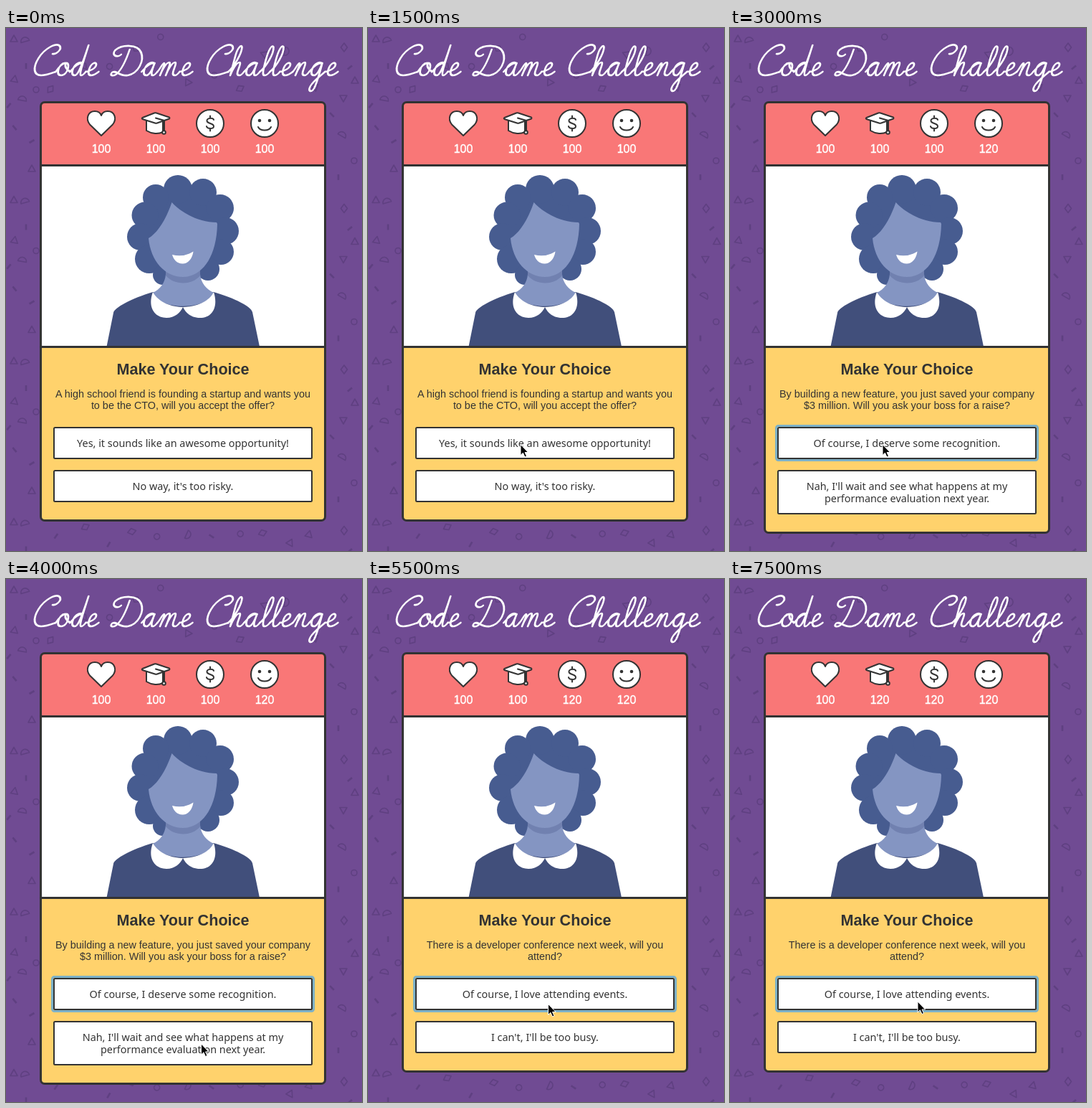
These frames come from a looping animation (497x729 px, 8000 ms). An HTML page:

```html
<!DOCTYPE html>
<html lang="en">
<head>
<meta charset="utf-8">
<title>Code Dame Challenge</title>
<style>
  html, body { margin: 0; width: 100%; height: 100%; overflow: hidden; background: #704b93; }
  svg { display: block; width: 497px; height: 729px; }
  text { text-anchor: middle; fill: #333; }
  .head { font: bold 21.6px "Liberation Sans", Arial, sans-serif; }
  .body { font: 14.4px "Liberation Sans", Arial, sans-serif; }
  .label { font: 14.4px "Noto Sans", sans-serif; }
  .score { font: 16px "Liberation Sans", Arial, sans-serif; fill: #fff; stroke: #fff; stroke-width: .4; }
  .icon { fill: #fff; stroke: #333; stroke-width: 2; stroke-linejoin: round; stroke-linecap: round; }
  .line { fill: none; }
  .button { fill: #fff; stroke: #333; stroke-width: 2; }
</style>
</head>
<body>
<svg viewBox="0 0 497 729">
  <rect width="497" height="729" fill="#704b93"/>
  <g id="confetti" fill="none" stroke="#5f4081" stroke-width="1.6" stroke-linejoin="round"/>
  <g id="title" role="img" aria-label="Code Dame Challenge" fill="none" stroke="#fff" stroke-width="2.7" stroke-linecap="round" stroke-linejoin="round"/>

  <rect class="frame" x="48.5" y="103.5" width="397" height="583" rx="5.5" fill="#ffd26c"/>
  <rect x="49" y="104" width="396" height="92" rx="5" fill="#f97777"/>
  <rect x="50" y="192" width="394" height="252" fill="#fff"/>

  <g class="icon">
    <path d="M133 150 L117 134.500C111 127 114 116 124 116C129 116 132 119 133 122C134 119 137 116 142 116C152 116 155 127 149 134.500Z"/>
    <path d="M196 128V143C204 148 213 148 219 145V129Z"/>
    <path d="M190.500 125 L207 118.500Q208.500 118 210 118.500L228 124.500Q229 125.500 228 126.500L211 132.500Q209.500 133 208 132.500L190.500 127Q189 126 190.500 125Z"/>
    <path class="line" d="M209 125.500 L221 129V143"/>
    <circle cx="220.500" cy="145.500" r="2.300"/>
    <circle cx="285" cy="133" r="19"/>
    <path class="line" d="M290 128C289 125 281 125 280.500 129C280 134 290 132 290 137C290 141 281 141 280 137M285 122.500V126M285 140V143.500"/>
    <circle cx="361" cy="133" r="19"/>
    <path class="line" d="M352 138C355 144 367 144 370 138"/>
  </g>
  <g fill="#333"><circle cx="354" cy="129" r="2.300"/><circle cx="368" cy="129" r="2.300"/></g>
  <g id="scores"></g>

  <g id="hair" fill="#475c90"><ellipse cx="247" cy="280" rx="62" ry="62"/></g>
  <path fill="#414f7b" d="M140.500 444 L150 397C151 390 175 377 205 368H290C320 377 342 388 344 396L354 444Z"/>
  <path fill="#8495c2" d="M223 330V343C222 356 215 364 205 369C212 394 282 394 290 369C280 364 272 356 271 343V330Z"/>
  <path fill="#7181b0" d="M223 334H271V345C260 359 235 359 223 345Z"/>
  <path fill="#8495c2" d="M231.500 243C223 268 211 286 199 293C202 325 222 347 247 347C272 347 294 322 295 273L294 271C270 271 245 258 231.500 243Z"/>
  <path fill="#fff" d="M232 316Q248 320 261.500 311.500C260 322 254 328.500 246.500 328.500C239 328.500 234 323 232 316Z"/>
  <path fill="#fff" d="M205 368C197 390 208 404 224 404C236 404 243 397 247 389C251 397 258 404 271 404C287 404 297 390 290 368C283 383 262 389 247 389C232 389 213 383 205 368Z"/>

  <path d="M48 191.500H446M48 444.500H446" stroke="#333" stroke-width="3"/>
  <rect class="frame" x="48.5" y="103.5" width="397" height="583" rx="5.5" fill="none" stroke="#333" stroke-width="3"/>

  <text class="head" x="247" y="483">Make Your Choice</text>
  <g id="question"></g>
  <rect id="ring" x="64.500" y="554.500" width="365" height="48" rx="3" fill="none" stroke="#7db1c7" stroke-width="3"/>
  <rect class="button" x="67" y="557" width="360" height="43" rx="1.500"/>
  <rect class="button" id="second" x="67" y="617" width="360" height="43" rx="1.500"/>
  <g id="yes"></g>
  <g id="no"></g>
  <path id="cursor" d="M0 0V15L3.400 11.800L6 17.500L8.500 16.400L6 11H10.600Z" fill="#000" stroke="#fff" stroke-width="1" stroke-linejoin="round"/>
</svg>
<script>
const $ = id => document.getElementById(id);
const LOOP = 8000;

const scenes = [
  { at: 0,
    question: ['A high school friend is founding a startup and wants you', 'to be the CTO, will you accept the offer?'],
    yes: ['Yes, it sounds like an awesome opportunity!'],
    no: ["No way, it's too risky."] },
  { at: 3000,
    question: ['By building a new feature, you just saved your company', '$3 million. Will you ask your boss for a raise?'],
    yes: ['Of course, I deserve some recognition.'],
    no: ["Nah, I'll wait and see what happens at my", 'performance evaluation next year.'] },
  { at: 5500,
    question: ['There is a developer conference next week, will you', 'attend?'],
    yes: ['Of course, I love attending events.'],
    no: ["I can't, I'll be too busy."] }
];

// Pointer stops: time, x, y
const stops = [
  [250, 371, 130], [500, 316, 278], [1000, 214, 647], [1250, 212, 603], [1500, 213, 580.5],
  [3250, 242, 602], [3500, 272, 645], [3750, 271.5, 650], [4000, 272.5, 648], [4250, 253, 596],
  [4500, 251.5, 592.5], [6250, 305, 678], [6500, 277, 631], [6750, 261.5, 588], [7000, 262, 589]
];

// When each score goes from 100 to 120
const raises = [Infinity, 7500, 5000, 2500];

// Monoline script: [advance, path], baseline at 0
const bowl = 'M0-5C2-8 6-17 14-17C8-20 3-14 3-7C3-1 6 0 8 0C12 0 14-8 ';
const tail = 'C19 0 21-3 22-5';
const glyphs = {
  C: [34, 'M23-30C28-29 35-36 30-41C24-46 10-38 5-24C0-10 5 0 15 0C23 0 29-3 34-5'],
  D: [42, 'M17-36C16-22 13-8 8-2C4 2-2 0 1-4C5-8 14 2 24 0C38-3 42-20 34-32C26-44 4-43-3-35C-7-28 3-24 7-29'],
  a: [22, bowl + '15-17C14-10 13 0 17 0' + tail],
  d: [22, bowl + '16-42C15-20 13 0 17 0' + tail],
  e: [18, 'M0-5C6-6 13-10 12-15C11-19 5-18 4-10C3-2 6 0 9 0C13 0 16-3 18-5'],
  g: [22, bowl + '15-17C15-5 15 10 13 18C11 25 5 22 7 15C9 8 16 2 22-5'],
  h: [22, 'M0-5C6-12 12-30 10-39C8-44 4-38 4-28L4 0C5-8 8-18 12-18C15-18 13-9 13-5C13 0 15 0 17 0' + tail],
  l: [14, 'M0-5C7-12 13-30 10-39C7-44 4-36 4-22C4-8 4 0 8 0C11 0 13-3 14-5'],
  m: [31, 'M0-5C3-9 4-17 6-17C8-17 6-8 5 0C6-8 9-18 13-18C16-18 14-8 13 0C14-8 17-18 21-18C24-18 22-9 22-5C22 0 25 0 26 0C28 0 30-3 31-5'],
  n: [23, 'M0-5C3-9 4-17 6-17C8-17 6-8 5 0C6-8 9-18 13-18C16-18 14-9 14-5C14 0 17 0 18 0C20 0 22-3 23-5'],
  o: [20, 'M0-5C2-10 6-17 11-17C5-18 3-12 3-8C3-3 5 0 9 0C14 0 16-5 16-10C16-15 13-18 11-17C10-11 16-8 20-5']
};

function script(word, x) {
  const letters = [...word].map(c => {
    const [advance, d] = glyphs[c];
    const path = `<path transform="translate(${x})" d="${d}"/>`;
    x += advance;
    return path;
  });
  return letters.join('');
}

$('title').setAttribute('transform', 'translate(0 66) skewX(-15)');
$('title').innerHTML = script('Code', 34) + script('Dame', 146) + script('Challenge', 275);

// Background confetti
const shapes = {
  tri: 'M0-5L5 4H-5Z',
  gem: 'M0-6L4.5 0L0 6L-4.5 0Z',
  dash: 'M0-4V4',
  ring: 'M-4 0A4 4 0 1 0 4 0A4 4 0 1 0-4 0Z',
  half: 'M-6 3A6 6 0 0 1 6 3Z'
};
const edge = [
  ['tri', 11, 15, 0], ['half', 26, 16, -15], ['dash', 28, 53, 0], ['tri', 12, 71, 10],
  ['ring', 42, 86, 0], ['half', 23, 98, 10], ['dash', 4, 108, 40], ['dash', 12, 139, -40],
  ['tri', 36, 196, 0], ['dash', 36, 158, 60], ['gem', 472, 27, 0], ['dash', 480, 55, 50],
  ['tri', 471, 98, 180], ['ring', 486, 185, 0], ['dash', 455, 121, -45], ['dash', 464, 208, 0],
  ['half', 470, 148, 30], ['tri', 487, 73, 0]
];
const bits = [];
const bit = (kind, x, y, turn) => bits.push(
  `<path transform="translate(${x} ${y}) rotate(${turn})" d="${shapes[kind]}"${kind === 'dash' ? ' stroke-width="2.6"' : ''}/>`);
for (let top = 0; top < 729; top += 224.5)
  for (const [kind, x, y, turn] of edge) bit(kind, x, y + top, turn);

let seed = 7;
const random = () => (seed = seed * 16807 % 2147483647) / 2147483647;
const kinds = Object.keys(shapes);
for (let i = 0; i < 22; i++) {
  const x = 62 + i % 11 * 36 + random() * 14;
  const y = (i < 11 ? 8 : 694) + random() * (i < 11 ? 84 : 28);
  bit(kinds[Math.floor(random() * 5)], x, y, random() * 180);
}
$('confetti').innerHTML = bits.join('');

const curls = [
  [240, 225, 20], [275, 229, 19], [299, 251, 19], [306, 283, 19], [300, 312, 18], [282, 336, 16],
  [209, 236, 18], [194, 261, 18.5], [188, 291, 19], [200, 322, 20], [219, 344, 14]
];
$('hair').innerHTML += curls.map(([x, y, r]) => `<circle cx="${x}" cy="${y}" r="${r}"/>`).join('');

$('scores').innerHTML = raises.map((_, i) => `<text class="score" x="${133 + 76 * i}" y="174"></text>`).join('');
const scores = [...$('scores').children];
const frames = document.querySelectorAll('.frame');

function write(id, lines, style, y, step) {
  $(id).innerHTML = lines.map((s, i) => `<text class="${style}" x="247" y="${y + i * step}">${s}</text>`).join('');
}

const latest = (list, t, time) => list.filter(item => time(item) <= t).pop();

let shown;
function showScene(scene) {
  if (scene === shown) return;
  shown = scene;
  const extra = (scene.no.length - 1) * 17;
  write('question', scene.question, 'body', 515, 16);
  write('yes', scene.yes, 'label', 584, 17);
  write('no', scene.no, 'label', 644, 17);
  $('second').setAttribute('height', 43 + extra);
  frames.forEach(f => f.setAttribute('height', 583 + extra));
}

function draw(t) {
  showScene(latest(scenes, t, s => s.at));
  scores.forEach((el, i) => { el.textContent = t < raises[i] ? '100' : '120'; });
  $('ring').style.display = t < 2500 ? 'none' : '';
  const stop = latest(stops, t, s => s[0]);
  $('cursor').style.display = stop ? '' : 'none';
  if (stop) $('cursor').setAttribute('transform', `translate(${stop[1]} ${stop[2]})`);
}

const start = performance.now();
function tick() {
  draw((performance.now() - start) % LOOP);
  requestAnimationFrame(tick);
}
tick();
</script>
</body>
</html>
```
